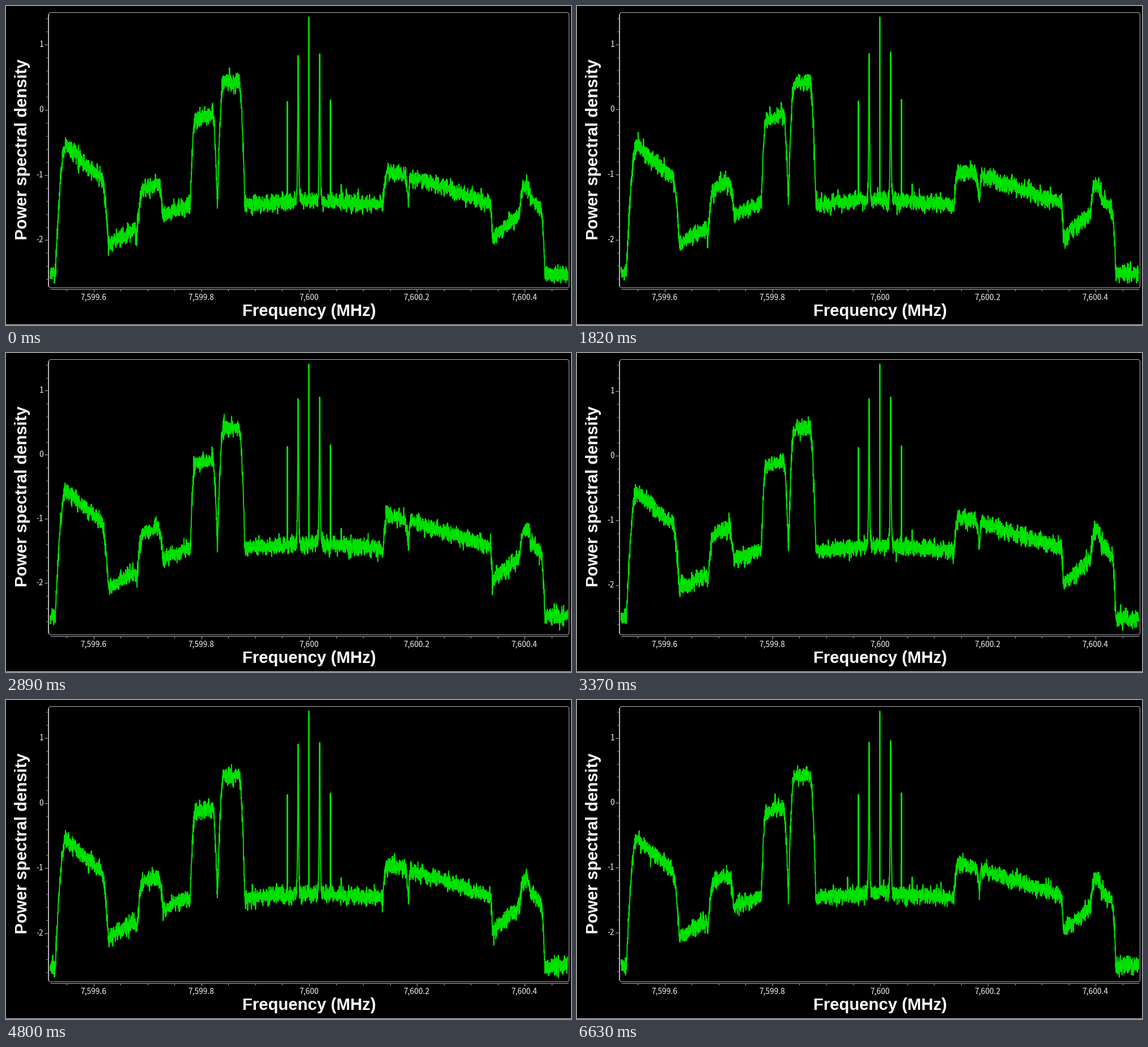
These frames come from a looping animation (997 px wide and 562 px high, 6.96 s). A matplotlib script:

```python
import numpy as np
import matplotlib.pyplot as plt
from matplotlib.animation import FuncAnimation
from matplotlib.patches import FancyBboxPatch, Rectangle

W, H, DPI = 997, 562, 64
LOOP, STEP = 6960, 20
PT = 72 / DPI  # points per pixel

GREEN, GREY, WHITE = "#00e000", "#b4b4b4", "#f4f4f4"
TOP, BOTTOM = 19.5, 488.5  # the trace is auto-scaled between these rows
FLOOR, NOISE = -2.52, .063

# Moments at which a new sweep arrives
STARTS = [0, 330, 820, 1320, 1820, 2230, 2560, 2890, 3370,
          3730, 4140, 4390, 4800, 5050, 5590, 5890, 6300, 6630]

# Channels: left and right edge (px), level at each edge, roll-off width (px)
CHANNELS = [
    (106, 167, -.56, -1.04, 13.5),
    (183, 227, -2.05, -1.84, 9),
    (242, 268, -1.22, -1.13, 13),
    (277, 325, -1.62, -1.45, 9),
    (334, 364, -.15, -.08, 7.6),
    (384, 410.5, .41, .42, 8),
    (421, 535, -1.46, -1.39, 6),
    (535, 662, -1.39, -1.46, 8),
    (673, 703, -.95, -1.01, 11),
    (714, 854, -1.03, -1.44, 6),
    (860, 906, -1.96, -1.60, 9),
    (914, 920, -1.17, -1.18, 12),
    (928, 943, -1.38, -1.53, 8),
]
X = np.linspace(78, 991, 4096)


def channel(a, b, la, lb, roll):
    """Sloped plateau that falls off quadratically outside its edges."""
    outside = np.maximum(np.maximum(a - X, X - b), 0)
    return np.interp(X, [a, b], [la, lb]) - (outside / roll) ** 2


MEAN = np.maximum.reduce([channel(*c) for c in CHANNELS])
MEAN = np.maximum(MEAN, FLOOR)


def sweep(k):
    """Rows of the trace, row of level 0 and rows per unit for sweep k."""
    rng = np.random.default_rng(40 + k)
    drift = k / (len(STARTS) - 1)
    noise = rng.normal(0, NOISE, X.size)
    burst = .62 * np.exp(-1.2 * (k - 14) ** 2)
    level = MEAN + burst * np.exp(-((X - 217) / 9) ** 2 / 2)

    tone = .83 + .1 * drift
    for x, top in ((515.5, tone), (553.5, tone + .025)):
        shape = np.exp(-np.maximum(np.abs(X - x) - .35, 0) / .75)
        level += (top - level) * shape
        noise *= 1 - shape

    peak = rng.normal(1.415, .006)
    carriers = [(477.5, -1.45 + .3 * drift), (496.5, .125),
                (534.5, peak), (572.5, .15), (591.5, -1.15)]
    for x, top in carriers:
        i = np.abs(X - x).argmin()
        level[i], noise[i] = top, 0

    level += noise
    unit = (BOTTOM - TOP) / (peak - level.min())
    zero = TOP + peak * unit
    return zero - unit * level, zero, unit


def segments(starts, ends):
    """Join separate strokes into one broken line."""
    return np.column_stack([starts, ends, np.full(len(starts), np.nan)]).ravel()


def y_ticks(zero, unit):
    n = np.arange(-14, 8)
    rows = zero - unit * n / 5
    keep = (rows >= 14) & (rows <= 494)
    n, rows = n[keep], np.floor(rows[keep]) + .5
    left = np.where(n % 5 == 0, 68, 71)
    return segments(left, np.full(len(n), 73)), segments(rows, rows)


fig = plt.figure(figsize=(W / DPI, H / DPI), dpi=DPI, facecolor="black")
ax = fig.add_axes([0, 0, 1, 1])
ax.set(xlim=(0, W), ylim=(H, 0))
ax.axis("off")


def stroke(x, y):
    return ax.plot(x, y, color=GREY, lw=PT, snap=True,
                   solid_capstyle="butt")[0]


def label(x, y, text, ha):
    return ax.text(x, y, text, color=WHITE, ha=ha, va="baseline",
                   family="Noto Sans CJK JP", size=13.8 * PT)


ax.add_patch(FancyBboxPatch((75.5, 11.5), 918, 485, fc="none", ec=GREY, lw=PT,
                            boxstyle="round,pad=0,rounding_size=4"))
ax.add_patch(Rectangle((0, H - 1), W, 1, fc="#dcdcdc", lw=0))

# Frequency axis: a tick every 0.05 MHz, a label every 0.2 MHz
stroke([78, 992], [498.5, 498.5])
n = np.arange(-9, 10)
tick_x = np.floor(534.5 + 47.53 * n) + .5
stroke(segments(tick_x, tick_x),
       segments(np.full(n.size, 499), np.where(n % 4 == 0, 504, 502)))
for i in range(-2, 3):
    label(534.5 + 190.1 * i, 517,
          f"{7600 + i / 5:,.1f}".removesuffix(".0"), "center")

# Level axis
stroke([73.5, 73.5], [14, 494])
ticks = stroke([], [])
y_labels = {v: label(66, 0, str(v), "right") for v in (1, 0, -1, -2)}

title = dict(color="white", family="Liberation Sans", weight="bold",
             size=29.2 * PT, va="baseline", ha="center")
ax.text(534.5, 546, "Frequency (MHz)", **title)
ax.text(37, 253, "Power spectral density", rotation=90,
        rotation_mode="anchor", **title)

trace, = ax.plot([], [], color=GREEN, lw=2 * PT)
SWEEPS = [sweep(k) for k in range(len(STARTS))]


def update(i):
    k = np.searchsorted(STARTS, i * STEP + STEP / 2, side="right") - 1
    rows, zero, unit = SWEEPS[k]
    trace.set_data(X, rows)
    ticks.set_data(*y_ticks(zero, unit))
    for value, text in y_labels.items():
        text.set_y(np.floor(zero - unit * value) + 5)
    return [trace, ticks, *y_labels.values()]


anim = FuncAnimation(fig, update, frames=LOOP // STEP, interval=STEP,
                     repeat=True, repeat_delay=0)
plt.show()
```
